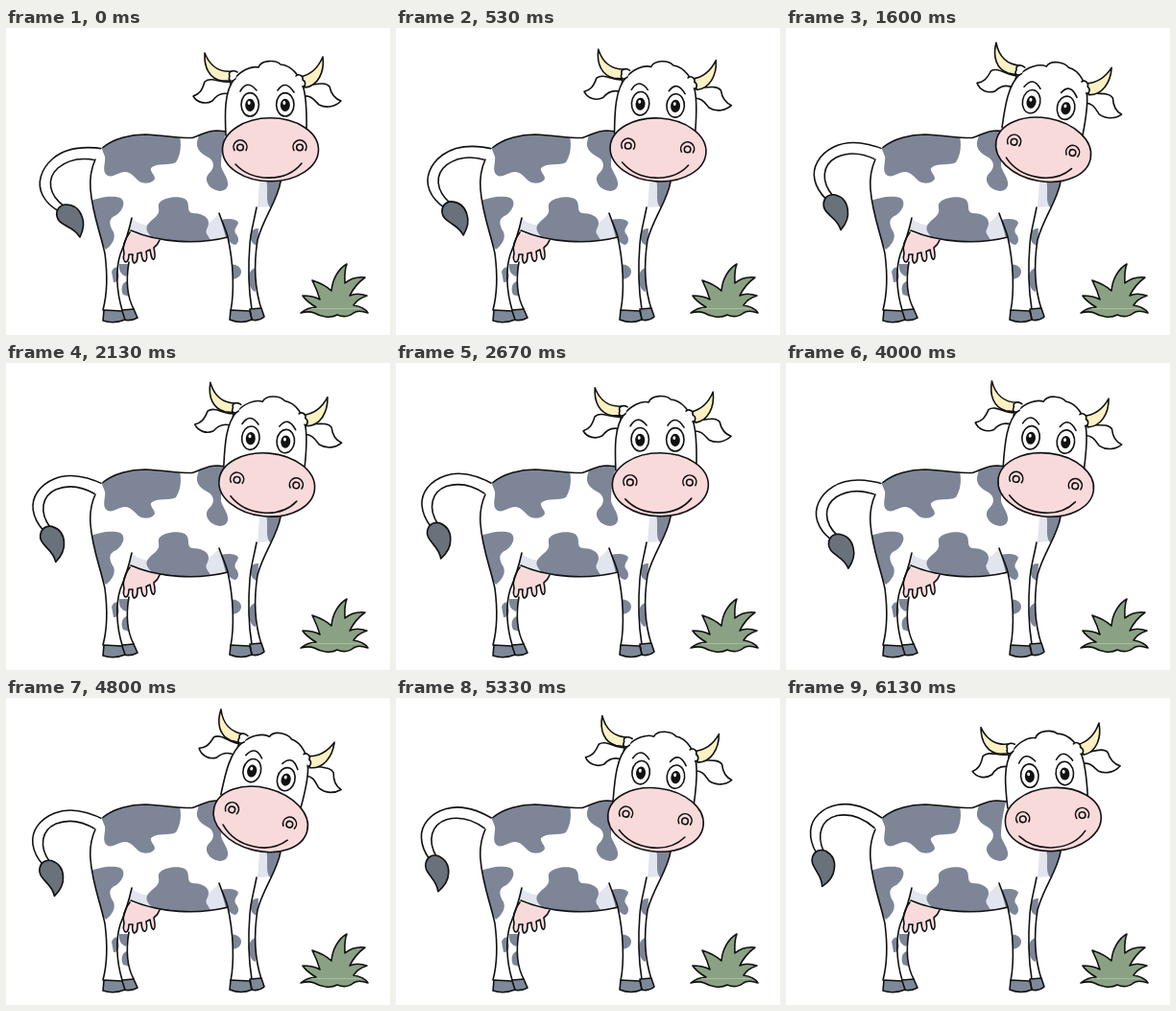
These frames come from a looping animation (400x320 px, 7.73 s). An HTML page:

```html
<!DOCTYPE html>
<html lang="en">
<head>
<meta charset="utf-8">
<title>Cow</title>
<style>
html, body { margin: 0; width: 100%; height: 100%; overflow: hidden; background: #fff; }
svg { display: block; width: 100vw; height: 100vh; }
.ink { fill: none; stroke: #111; stroke-width: 1.6; stroke-linecap: round; stroke-linejoin: round; }
.white { fill: #fff; }
.spot { fill: #7d8597; }
.shade { fill: #e2e5ee; }
.hoof { fill: #7d8998; }
.tuft { fill: #69717a; }
.pink { fill: #f8dadb; }
.horn { fill: #fbf1c3; }
.grass { fill: #8aa283; }
</style>
</head>
<body>
<svg viewBox="0 0 400 320">
  <defs>
    <path id="shape" d="M100 125C112 115 130 111 145 111C165 112 182 115 194 114.5C203 112 208 107 220 107L232 108L287 159
      C283 180 268 198 262 221C259 240 258 268 266 293L234 295C238 275 237 245 231 218C200 226 160 224 130 211
      L128 244C125 262 125 278 133 293L101 294C106 275 106 258 103 235C98 212 90 194 88 168C87 156 89 146 92 137Z"/>
    <clipPath id="clip"><use href="#shape"/></clipPath>
  </defs>

  <g id="tail">
    <path class="ink white" d="M102 126C82 123 62 125 49 136C36 147 32 162 38 174C42 182 48 187 55 191L61 186
      C44 174 42 157 54 146C65 137 80 135 94 138"/>
    <path class="ink tuft" d="M62 184C55 185 52 190 53 196C54 202 59 204 64 207C70 210 74 213 77 218C81 210 82 203 79 196C76 188 70 184 62 184Z"/>
  </g>

  <use href="#shape" class="white"/>
  <g clip-path="url(#clip)">
    <g class="shade">
      <path d="M131 199C138 204 146 206 152 206L152 222L126 213Z"/>
      <path d="M205 208C212 203 218 198 222 193L231 219L207 223Z"/>
      <path d="M264 161L274 159L275 186L262 187Z"/>
    </g>
    <g class="spot">
      <path d="M99 124C110 112 130 106 181 113C183 122 182 132 177 140C170 144 157 140 151 146C150 150 155 153 155 157
        C153 162 144 163 139 160C134 156 130 150 124 150C117 150 112 156 106 154C99 150 104 141 103 134Z"/>
      <path d="M201 111L230 104C227 116 224 130 224 144C226 151 232 157 231 164C229 172 219 171 213 166
        C207 160 208 154 213 150C218 144 216 138 211 135C203 131 198 126 199 119Z"/>
      <path d="M161 181C167 176 180 175 186 178C193 182 187 191 194 193C202 193 211 196 211 203C211 209 206 211 210 216L216 226
        L160 226C153 218 144 213 147 206C150 200 157 198 159 192C160 188 157 184 161 181Z"/>
      <path d="M84 183C92 177 110 174 119 177C126 181 121 191 115 195C107 198 107 204 111 211C115 217 112 225 104 231L82 200Z"/>
      <path d="M271 158L290 154L288 170L276 188C269 181 274 170 271 158Z"/>
      <path d="M224 200C231 198 241 199 242 203C241 207 237 209 239 214C243 218 243 224 239 226C235 226 233 222 229 219Z"/>
      <path d="M232 248C238 244 245 249 245 254C245 259 240 262 234 262Z"/>
      <path d="M263 209C257 208 253 214 255 219C255 223 258 226 262 227Z"/>
      <path d="M262 250C256 249 252 256 253 263C254 270 256 274 260 275Z"/>
      <path d="M110 254C113 247 118 249 117 255C119 260 116 266 112 265Z"/>
      <path d="M118 246L129 246C126 252 127 256 125 259C119 257 117 251 118 246Z"/>
      <path d="M126 264C121 265 119 272 122 278L129 280Z"/>
    </g>
  </g>

  <path class="ink pink" d="M129 213C123 221 121 228 123 235C122 239 122 243 125 244C128 243 128 239 128 236L132 236
    C131 240 132 245 134 245C137 244 137 240 137 235L141 234C141 240 143 244 145 243C147 242 147 238 146 233L150 231
    C151 237 152 242 154 241C156 240 155 234 154 229C158 226 159 224 160 221"/>
  <g class="ink">
    <path d="M101 124.5C112 115 130 111 145 111C165 112 182 115 194 114.5C203 112 208 107 220 107L232 108"/>
    <path d="M93 137C89 146 87 156 88 168C90 194 98 212 103 235C106 258 106 275 101 294"/>
    <path d="M131 198C128 212 124 224 119 236C114 252 115 274 121 294"/>
    <path d="M128 244C125 262 125 278 133 293"/>
    <path d="M130 211C160 224 200 226 231 218"/>
    <path d="M222 193C225 202 229 210 231 218C237 245 238 275 234 295"/>
    <path d="M261 187C258 203 255 212 254 225C252 250 253 275 256 293"/>
    <path d="M286 160C283 180 268 198 262 221C259 240 258 268 266 293"/>
  </g>
  <g class="ink hoof">
    <path d="M121 294L133 293L137 302Q130 306 122 304Z"/>
    <path d="M102 294L121 295L124 304Q112 309 101 305Z"/>
    <path d="M254 293L266 292L269 301Q263 306 256 304Z"/>
    <path d="M234 294L254 295L256 304Q245 309 233 304Z"/>
  </g>

  <g id="head">
    <path class="ink white" d="M234 56C224 58 214 50 207 56C204 66 201 69 195 71C199 78 208 80 215 76C220 69 226 67 233 69Z"/>
    <path class="ink white" d="M310 60C320 60 332 55 337 61C339 70 343 74 349 76C343 82 334 84 326 80C321 75 318 70 310 71Z"/>
    <path class="ink horn" d="M207 26C206 41 212 53 225 55L233 55L237 45C222 47 212 39 207 26Z"/>
    <path class="ink horn" d="M330 30C332 46 325 60 312 62L306 51C317 49 325 42 330 30Z"/>
    <path class="ink white" d="M229 112C228 90 227 66 238 53C244 45 255 39 263 41C266 33 281 33 286 38
      C298 39 307 51 310 63C314 78 313 95 313 112"/>
    <path class="ink white" d="M241 46C236 43 231 46 233 50C231 55 235 57 239 53"/>
    <path class="ink white" d="M302 50C305 47 310 50 309 54C313 56 312 61 309 61"/>
    <g id="eyes"></g>
    <path class="ink" d="M244 66Q251 53 261 65M283 65Q291 53 300 67"/>
    <ellipse class="ink pink" cx="275.5" cy="126.8" rx="50" ry="33"/>
    <path class="ink" d="M239 142C257 161 292 161 308 141"/>
    <g id="nose"></g>
  </g>

  <path class="ink grass" d="M307 297C312 293 318 291 323 291C318 288 312 284 309 279C316 279 322 280 327 283C325 276 322 269 319 263
    C328 266 335 270 339 274C340 262 346 251 355 246C352 254 353 260 353 266C359 261 366 259 374 260
    C367 265 362 271 358 279C364 276 370 277 376 279C370 281 365 284 362 289C369 290 374 292 377 297
    C371 295 366 294 362 297C356 302 350 301 345 299C338 303 328 301 321 297C316 295 311 296 307 297Z"/>
  <path d="M318 292.5H370" stroke="#b9c7b5" stroke-width=".7"/>
</svg>
<script>
const LOOP = 7730, STEP = 800 / 3, LAST = 23;
// [step, degrees]
const headKeys = [[0, 0], [6, 10.4], [10, 0.2], [11, -2.2], [12, -1], [18, 14.4], [23, -4]];
const tailKeys = [[0, 0], [2, 4.7], [6, 14], [10, 22], [15, 8.3], [18, 19], [22, 29.7], [23, 29.7]];
const $ = id => document.getElementById(id);

$("eyes").innerHTML = [254.2, 290.8].map(x =>
  `<ellipse class="ink white" cx="${x}" cy="79.8" rx="9.2" ry="12.2"/>
   <ellipse cx="${x}" cy="80.3" rx="5" ry="6.6" fill="#111"/>
   <ellipse cx="${x - 1}" cy="78" rx="1.5" ry="1.9" fill="#fff"/>`).join("");
$("nose").innerHTML = [244, 306].map(x =>
  `<path class="ink" d="M${x - 6} 127.5A7 7 0 1 1 ${x + 6} 127.5"/>
   <circle class="ink" cx="${x}" cy="124.5" r="3.3"/>`).join("");

function angle(keys, s) {
  const i = Math.max(1, keys.findIndex(k => k[0] >= s));
  const [a, u] = keys[i - 1], [b, v] = keys[i];
  return u + (v - u) * (s - a) / (b - a);
}

const startOf = s => Math.round(s * STEP / 10) * 10;

function draw(ms) {
  const t = ms % LOOP;
  let s = Math.min(LAST, Math.floor(t / STEP) + 1);
  while (startOf(s) > t) s--;
  $("head").setAttribute("transform", `rotate(${angle(headKeys, s)} 272 86)`);
  $("tail").setAttribute("transform", `rotate(${angle(tailKeys, s)} 98 133)`);
}

const start = performance.now();
function tick() {
  draw(performance.now() - start);
  requestAnimationFrame(tick);
}
tick();
</script>
</body>
</html>
```
